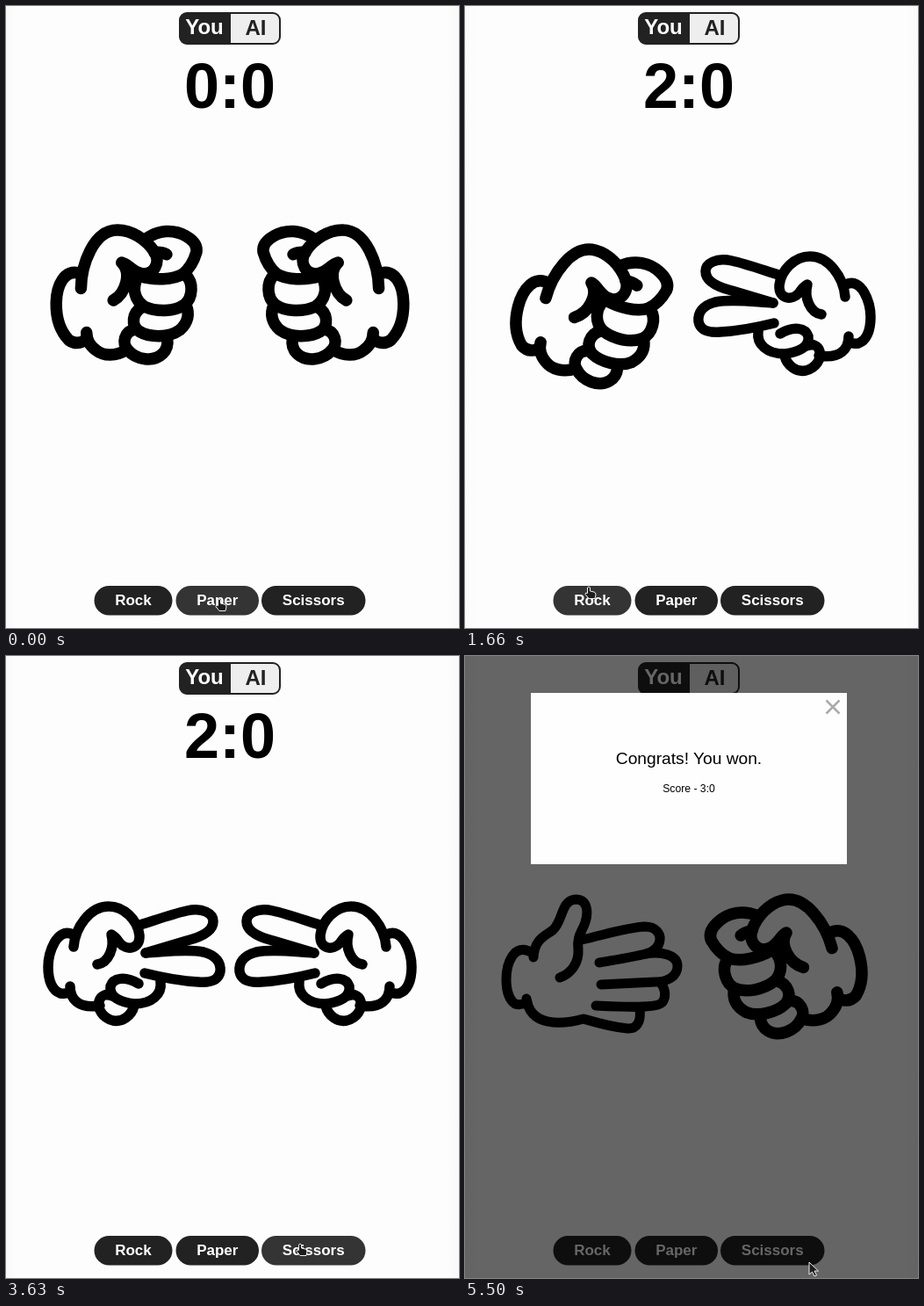
Recreate the animation shown at these times as an HTML page. Size 516x708 px, loop 5530 ms.

```html
<!DOCTYPE html>
<html lang="en">
<head>
<meta charset="utf-8">
<title>Rock Paper Scissors</title>
<style>
  html, body { margin: 0; width: 100%; height: 100%; overflow: hidden; background: #fdfdfd; }
  svg { display: block; width: 100vw; height: 100vh; }
  text { font-family: "Liberation Sans", Arial, sans-serif; text-anchor: middle; }
  .bold { font-weight: bold; }
  .hand { fill: none; stroke: #000; stroke-linecap: round; stroke-linejoin: round; }
  .button text { font-size: 17px; fill: #fff; }
  .button rect { fill: #222; }
  .button.hover rect { fill: #343434; }
  .cursor path { fill: #1c1c1c; stroke: #eee; stroke-width: 1; stroke-linejoin: round; }
</style>
</head>
<body>
<svg viewBox="0 0 516 708" preserveAspectRatio="none">
  <defs>
    <linearGradient id="edge">
      <stop offset="0" stop-color="#f9f9f9"/><stop offset=".02" stop-color="#fdfdfd"/>
      <stop offset=".975" stop-color="#fdfdfd"/><stop offset="1" stop-color="#f8f8f8"/>
    </linearGradient>
    <g id="rock" class="hand" stroke-width="13.5" transform="rotate(14.5 43 354)">
      <path d="M84 304C66 298 57 318 57 338C57 356 63 371 72 380Q81 386 90 380"/>
      <path d="M85 321C85 295 98 254 126 254C142 254 158 264 168 278C176 290 168 306 153 303C143 301 139 293 131 291C143 302 136 326 122 334"/>
      <path d="M131 291L155 304L146 318L139 306Z" fill="#000" stroke-width="7"/>
      <path d="M158 264C172 253 190 252 204 260C213 265 217 271 216 278C213 289 207 298 201 303C190 310 168 311 152 306M168 279Q176 278 182 281"/>
      <path d="M149 308C143 320 146 334 158 341C172 347 192 346 203 338C213 330 213 312 204 304"/>
      <path d="M154 342C144 348 142 362 152 369C164 376 186 376 198 367C208 358 209 348 205 339"/>
      <path d="M147 367C135 369 132 383 139 390C149 402 169 404 179 394C184 389 185 383 184 377"/>
      <path d="M138 390C126 398 112 398 103 391C96 386 92 379 92 371"/>
    </g>
    <g id="scissors" class="hand" stroke-width="11.5">
      <path d="M153 306C175 299 192 293 206 290C224 286 236 293 236 302C236 313 222 320 206 324L159 338"/>
      <path d="M159 338C180 337 205 333 225 337C240 341 245 350 244 359C242 370 232 372 219 371C198 370 178 366 158 361"/>
      <path d="M77 331C79 308 96 285 117 285C134 285 150 300 152 318C153 334 137 336 129 326Q125 320 120 317C124 332 117 349 104 351"/>
      <path d="M76 317C58 308 48 338 48 354C48 370 53 381 62 384Q69 385 73 382"/>
      <path d="M73 376C73 390 82 402 107 398"/>
      <path d="M176 371C178 385 166 396 146 396C130 394 117 388 119 376C122 366 136 364 151 373"/>
      <path d="M146 398C143 410 132 417 122 415C110 412 104 402 106 393C108 386 114 384 121 387"/>
    </g>
    <g id="paper" class="hand" stroke-width="11">
      <path d="M78 343C79 322 92 318 100 312C112 302 109 278 126 277C139 277 141 290 137 303C134 313 127 318 129 334C130 350 120 362 108 366"/>
      <path d="M133 323C160 317 185 309 205 308C217 308 223 316 222 323C221 333 213 337 206 339C190 343 170 346 153 349"/>
      <path d="M206 339C224 336 242 340 242 353C242 365 230 371 217 371L155 374"/>
      <path d="M222 371C229 379 229 388 225 394C219 401 190 400 149 398"/>
      <path d="M199 402C201 417 195 425 185 424C165 422 152 418 135 413C110 420 74 422 70 390"/>
      <path d="M77 338C55 324 47 352 47 368C47 382 51 392 57 396Q64 398 71 394"/>
    </g>
  </defs>

  <rect width="516" height="708" fill="url(#edge)"/>

  <rect x="198" y="8" width="114" height="35" rx="8" fill="#eee"/>
  <path d="M256 8H206a8 8 0 0 0-8 8V35a8 8 0 0 0 8 8H256Z" fill="#222"/>
  <rect x="198" y="8" width="114" height="35" rx="8" fill="none" stroke="#222" stroke-width="2"/>
  <text class="bold" x="226" y="32" font-size="24" fill="#fff">You</text>
  <text class="bold" x="284.500" y="33" font-size="24" fill="#222">AI</text>
  <text class="bold" id="score" x="255" y="116" font-size="72"></text>

  <use id="left"/>
  <use id="right"/>
  <g id="buttons"></g>

  <g id="modal">
    <rect width="516" height="708" opacity=".6"/>
    <rect x="75" y="42" width="360" height="195" fill="#fefefe"/>
    <path d="M411.500 50.500l15 15m0-15l-15 15" stroke="#aaa" stroke-width="2.500"/>
    <text x="255" y="123" font-size="19.200">Congrats! You won.</text>
    <text x="255" y="155" font-size="12.200">Score - 3:0</text>
  </g>

  <g id="cursor" class="cursor">
    <path id="pointer" d="M-1.500 1Q0-1 1.500 1V5L6 6Q8 6.500 8 9L7 13.500H0L-4 8.500Q-4 6-1.500 7.500Z"/>
    <path id="arrow" d="M0 0V14L3.500 11L6 16L8.500 15L6 10H10.500Z"/>
  </g>
</svg>
<script>
const LOOP = 5530, HALF_SHAKE = 327, REVEAL = 630, MAX_ANGLE = 45;
const $ = id => document.getElementById(id);

// start: virtual click time; shown: when the shaking fists become visible
const rounds = [
  { start: -66, shown: 0, you: 'paper', ai: 'rock', before: '0:0', after: '1:0' },
  { start: 960, shown: 1100, you: 'rock', ai: 'scissors', before: '1:0', after: '2:0' },
  { start: 2420, shown: 2560, you: 'scissors', ai: 'scissors', before: '2:0', after: '2:0' },
  { start: 3820, shown: 3958, you: 'paper', ai: 'rock', before: '2:0', after: '3:0' }
];
const MODAL_AT = rounds[3].start + REVEAL, ARROW_AT = 5100;

// time, x, y of the cursor tip
const cursorStops = [
  [0, 243, 675], [600, 243, 675], [900, 141, 661], [2050, 141, 661],
  [2340, 335, 669], [3630, 335, 669], [3800, 268, 667], [ARROW_AT, 268, 667],
  [5220, 258, 680], [5500, 392, 690], [LOOP, 392, 690]
];

const buttons = [['Rock', 100.5, 89], ['Paper', 193.5, 94.5], ['Scissors', 291, 118.5]].map(([label, x, width]) => {
  $('buttons').insertAdjacentHTML('beforeend',
    `<g class="button"><rect x="${x}" y="660" width="${width}" height="33.500" rx="16.750"/>` +
    `<text class="bold" x="${x + width / 2}" y="682">${label}</text></g>`);
  return { x, width, node: $('buttons').lastChild };
});

const bezier = (a, b, u) => 3 * a * u * (1 - u) ** 2 + 3 * b * u * u * (1 - u) + u ** 3;

// CSS "ease": cubic-bezier(.25, .1, .25, 1)
function ease(x) {
  let low = 0, high = 1;
  for (let i = 0; i < 20; i++) {
    const mid = (low + high) / 2;
    if (bezier(.25, .25, mid) < x) low = mid; else high = mid;
  }
  return bezier(.1, 1, low);
}

function shakeAngle(elapsed) {
  const phase = elapsed / HALF_SHAKE;
  return MAX_ANGLE * (phase < 1 ? ease(phase) : 1 - ease(phase - 1));
}

function cursorAt(t) {
  const i = cursorStops.findIndex(stop => stop[0] > t);
  const [t0, x0, y0] = cursorStops[i - 1], [t1, x1, y1] = cursorStops[i];
  const p = (t - t0) / (t1 - t0), k = p * p * (3 - 2 * p);
  return [x0 + (x1 - x0) * k, y0 + (y1 - y0) * k];
}

function draw(t) {
  const round = rounds.filter(r => r.shown <= t).pop();
  const elapsed = t - round.start, revealed = elapsed >= REVEAL;
  const turn = `rotate(${revealed ? 0 : -shakeAngle(elapsed)} 43 354)`;
  $('left').setAttribute('href', '#' + (revealed ? round.you : 'rock'));
  $('right').setAttribute('href', '#' + (revealed ? round.ai : 'rock'));
  $('left').setAttribute('transform', turn);
  $('right').setAttribute('transform', 'translate(510) scale(-1 1) ' + turn);
  $('score').textContent = revealed ? round.after : round.before;

  const modalOpen = t >= MODAL_AT, [x, y] = cursorAt(t);
  $('modal').style.display = modalOpen ? '' : 'none';
  $('cursor').setAttribute('transform', `translate(${x} ${y})`);
  let hovering = false;
  for (const b of buttons) {
    const over = !modalOpen && x >= b.x && x <= b.x + b.width && y >= 660 && y <= 693;
    b.node.classList.toggle('hover', over);
    hovering = hovering || over;
  }
  const usePointer = hovering || (modalOpen && t < ARROW_AT);
  $('pointer').style.display = usePointer ? '' : 'none';
  $('arrow').style.display = usePointer ? 'none' : '';
}

const began = performance.now();
function tick() {
  draw((performance.now() - began) % LOOP);
  requestAnimationFrame(tick);
}
tick();
</script>
</body>
</html>
```
